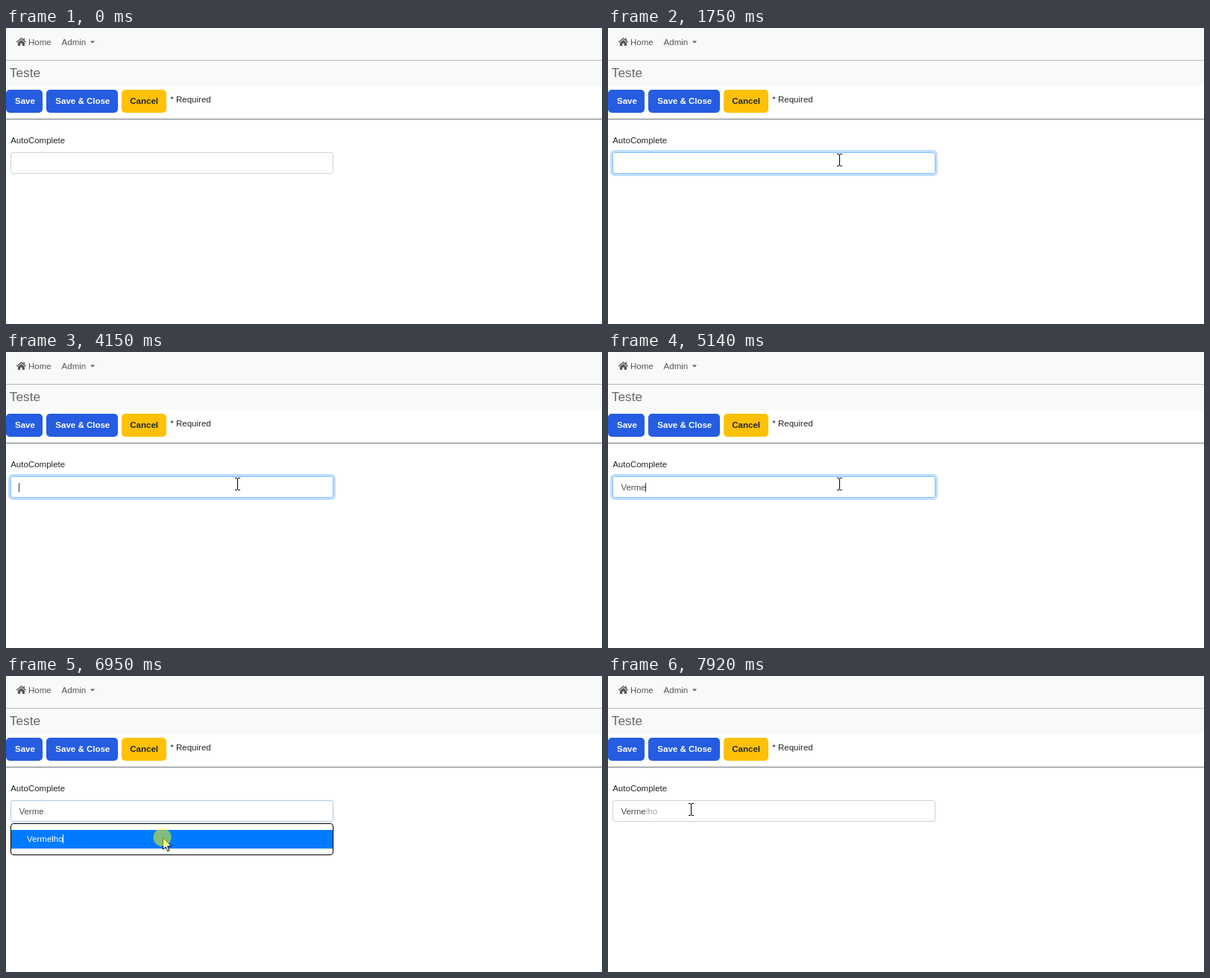
An HTML page that plays this animation: 799x398 px, repeating every 7990 ms.

```html
<!DOCTYPE html>
<html lang="en">
<head>
<meta charset="utf-8">
<title>Autocomplete field</title>
<style>
  html, body { margin: 0; width: 100%; height: 100%; overflow: hidden; background: #fff; }
  svg { display: block; width: 799px; height: 398px; }
  text { font: 11.52px "Liberation Sans", Arial, sans-serif; fill: #212529; white-space: pre; }
  .nav { fill: #555; }
  .title { font-size: 17.28px; fill: #666; }
  .btn { font-weight: bold; fill: #fff; }
  .dark { fill: #212529; }
  .value { fill: #495057; }
  .item { fill: #fff; }
</style>
</head>
<body>
<svg viewBox="0 0 799 398" xmlns="http://www.w3.org/2000/svg">
  <rect width="799" height="398" fill="#fff"/>
  <rect width="799" height="78" fill="#f8faf9"/>
  <rect y="43" width="799" height="1" fill="#b5b8b8"/>
  <rect y="122" width="799" height="1" fill="#6c757d"/>

  <!-- navigation -->
  <g fill="none" stroke="#555" stroke-width="1.5">
    <path d="M14.3 19.2L20.5 14L26.7 19.2"/>
    <path d="M24.2 13.5V16.5"/>
  </g>
  <path d="M16 19.7L20.5 16L25 19.7V24H21.8V20.8H19.2V24H16Z" fill="#555"/>
  <text class="nav" x="30" y="23">Home</text>
  <text class="nav" x="74.6" y="23">Admin</text>
  <path d="M113 17.5H119L116 20.5Z" fill="#555"/>
  <text class="title" x="4.8" y="66">Teste</text>

  <!-- buttons -->
  <rect y="83" width="49" height="31" rx="5" fill="#255ce1"/>
  <rect x="54" y="83" width="96" height="31" rx="5" fill="#255ce1"/>
  <rect x="155" y="83" width="60" height="31" rx="5" fill="#ffc107"/>
  <text class="btn" x="12" y="102">Save</text>
  <text class="btn" x="66.3" y="102">Save &amp; Close</text>
  <text class="btn dark" x="166.3" y="102">Cancel</text>
  <text x="220.3" y="100">* Required</text>

  <!-- field -->
  <text x="6.2" y="155">AutoComplete</text>
  <rect id="ring" x="4.5" y="165.5" width="436" height="32" rx="4.5" fill="none" stroke="#007bff" stroke-opacity=".25" stroke-width="3"/>
  <rect id="field" x="6.5" y="167.5" width="432" height="28" rx="2.8" fill="#fff"/>
  <text class="value" x="17.4" y="186"><tspan id="typed"></tspan><tspan id="rest" fill="#a0a4a8"></tspan></text>
  <rect id="caret" y="176" width="1" height="12" fill="#333"/>

  <!-- suggestions -->
  <g id="menu">
    <rect id="panel" x="6.5" y="198.5" width="432" rx="3.5" fill="#fff" stroke="#000"/>
    <rect x="7" y="207" width="431" height="25" fill="#007bff"/>
    <text id="first" class="item" x="28" y="223"></text>
    <text id="second" x="28" y="247">Vermelho</text>
    <rect id="mark" x="76" y="213" width="1" height="12" fill="#fff"/>
  </g>

  <!-- pointer -->
  <g id="pointer">
    <path id="arrow" d="M.5 .5V16.3L4.1 12.8L6.7 18.6L9 17.6L6.5 11.9H11.6Z" fill="#fff" stroke="#000"/>
    <path id="beam" d="M-3 -7.5H0M1 -7.5H4M.5 -7V8M-3 8.5H0M1 8.5H4" fill="none" stroke="#000" shape-rendering="crispEdges"/>
    <circle id="press" r="12" cx="-.5" fill="#ff0" fill-opacity=".5"/>
  </g>
</svg>
<script>
const LOOP = 7990, TICK = 69;
const el = {};
document.querySelectorAll("[id]").forEach(n => el[n.id] = n);

// pointer path: time, x, y
const path = [
  [250, 746, 377], [1010, 313, 181], [1080, 310, 178], [1350, 310, 178], [1351, 310, 177],
  [6335, 310, 177], [6880, 210, 217], [7020, 210, 217],
  [7160, 226, 261], [7260, 228, 270], [7330, 225, 268], [7920, 111, 179]
];
// typing: time, text, caret x
const typing = [
  [0, "", 17], [2620, "v", 22], [3880, "", 17], [4410, "V", 25], [4610, "Ve", 30],
  [4810, "Ver", 35], [5010, "Verm", 44], [5140, "Verme", 50]
];
// times at which the caret goes on or off, starting with on
const blinks = [1220, 1750, 2290, 3160, 3680, 4210, 4410, 5670, 6190, 6720];

const within = (t, a, b) => t >= a && t < b;
const ramp = (t, a, b) => Math.min(1, Math.max(0, (t - a) / (b - a)));
const ease = k => (1 - Math.cos(Math.PI * k)) / 2;
const show = (node, on) => node.setAttribute("display", on ? "inline" : "none");
const mix = (a, b, k) => "rgb(" + a.map((v, i) => Math.round(v + (b[i] - v) * k)) + ")";

function pointerAt(t) {
  let i = 0;
  while (i < path.length - 1 && path[i + 1][0] <= t) i++;
  const a = path[i], b = path[i + 1] || a;
  const step = a[0] + Math.floor((t - a[0]) / TICK) * TICK;
  const k = ease(a === b ? 0 : ramp(step, a[0], b[0]));
  return [1, 2].map(n => Math.round(a[n] + (b[n] - a[n]) * k));
}

function draw(t) {
  const focusIn = ramp(t, 1130, 1300);
  el.ring.setAttribute("opacity", ease(focusIn) * (1 - ease(ramp(t, 6790, 6955))));
  const blue = focusIn * (1 - ramp(t, 6790, 7110));
  el.field.setAttribute("stroke", mix([206, 209, 212], [128, 189, 255], blue));

  const [, text, caretX] = typing.filter(k => k[0] <= t).pop();
  const chosen = t >= 7090;
  el.typed.textContent = text;
  el.rest.textContent = chosen ? "lho" : "";
  el.caret.setAttribute("x", caretX);
  show(el.caret, blinks.filter(b => b <= t).length % 2);

  const two = within(t, 3620, 4150);
  show(el.menu, two || within(t, 6130, 7090));
  el.panel.setAttribute("height", two ? 66 : 42);
  el.first.textContent = two ? "Verde" : "Vermelho";
  show(el.second, two);
  show(el.mark, within(t, 6880, 7090));

  const [x, y] = pointerAt(t);
  const overField = within(x, 6, 439) && within(y, 167, 196);
  show(el.pointer, t >= 250);
  el.pointer.setAttribute("transform", `translate(${x} ${y})`);
  show(el.beam, overField);
  show(el.arrow, !overField);
  show(el.press, within(t, 1150, 1280) || within(t, 6880, 7090));
}

const start = performance.now();
function frame() {
  draw((performance.now() - start) % LOOP);
  requestAnimationFrame(frame);
}
frame();
</script>
</body>
</html>
```
